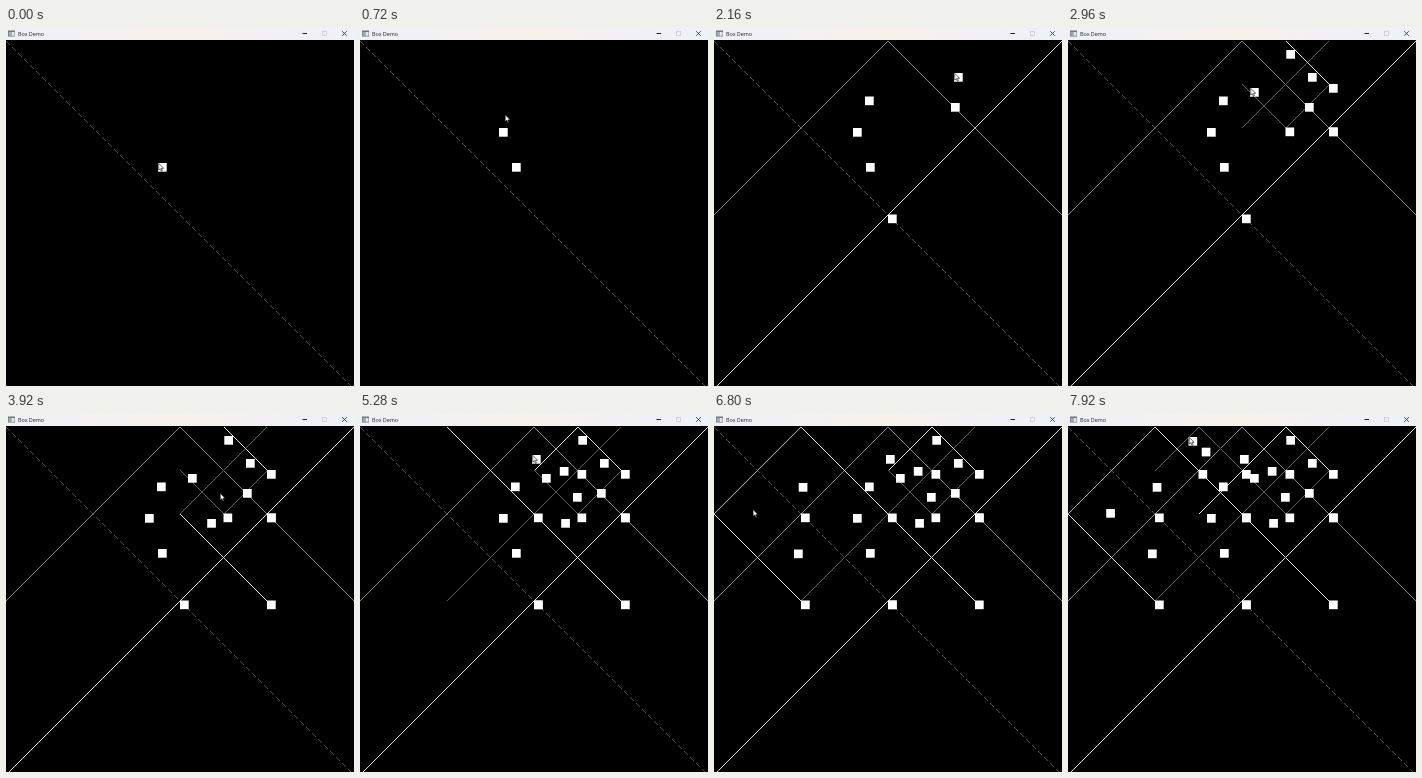
These frames come from a looping animation (348 px wide and 358 px high, 8 s). An HTML page with a canvas:

```html
<!DOCTYPE html>
<html lang="en">
<head>
<meta charset="utf-8">
<title>Quadtree</title>
<style>
  html, body { margin: 0; width: 100%; height: 100%; overflow: hidden; background: #000; }
  canvas { display: block; width: 348px; height: 358px; }
</style>
</head>
<body>
<canvas id="stage" width="348" height="358"></canvas>
<script>
const ctx = document.getElementById('stage').getContext('2d');
const LOOP = 8000, STEP = 80;
const TOP = 12.5, SIZE = 348, CAPACITY = 3, BOX = 8.7;

// Pointer path: time, x, y, and 1 where the button is pressed
const path = [
  [0, 152, 135, 1], [80, 152, 135], [480, 139, 100, 1], [560, 139, 100],
  [880, 150, 73], [1040, 151, 68.5, 1], [1120, 151, 68.5], [1360, 237.5, 75],
  [1440, 237, 75, 1], [1520, 237, 75], [1760, 238, 59], [2080, 240, 45, 1],
  [2160, 240, 45], [2400, 214, 24], [2560, 218.3, 22, 1], [2720, 218.3, 22],
  [2960, 182, 60, 1], [3120, 182, 60], [3520, 201.2, 105, 1], [3600, 201.2, 105],
  [3920, 213.5, 79], [4000, 213, 79, 1], [4080, 213, 79], [4320, 211, 67],
  [4400, 211, 67], [4640, 199.8, 53, 1], [4720, 199.8, 53], [5200, 172, 41, 1],
  [5360, 172, 41], [5600, 100, 64], [5840, 84.7, 69, 1], [5920, 84.7, 69],
  [6160, 80, 135.5, 1], [6240, 80, 135.5], [6400, 62, 96], [6480, 62, 96],
  [6720, 38.5, 95.5], [6880, 38.2, 95, 1], [6960, 38.2, 95], [7360, 133.7, 33.7, 1],
  [7520, 133.7, 33.7], [7840, 120.5, 23, 1], [8000, 120.5, 23]
];

// Line brightness by offset, in eighths of the field
const WHITE = '#dedede', LIGHT = '#b0b0b0', GREY = '#858585', DIM = '#5c5c5c', FAINT = '#4c4c4c';
const fallTone = { '-5': WHITE, '-4': GREY, '-3': DIM, '-2': WHITE, '2': WHITE };
const riseTone = { 2: LIGHT, 3: DIM, 4: GREY, 5: WHITE, 6: DIM, 7: DIM, 8: WHITE };

function pointer(t) {
  let i = 0;
  while (i < path.length - 2 && path[i + 1][0] <= t) i++;
  const [t0, x0, y0] = path[i], [t1, x1, y1] = path[i + 1];
  const u = (t - t0) / (t1 - t0), e = u * u * (3 - 2 * u);
  return [x0 + (x1 - x0) * e, y0 + (y1 - y0) * e];
}

// Quadrants: 0 top left, 1 top right, 2 bottom left, 3 bottom right
const makeNode = (x, y, size, quad) => ({ x, y, size, quad, points: [], kids: null });

function insert(node, p) {
  node.points.push(p);
  if (node.kids) return insertKid(node, p);
  if (node.points.length > CAPACITY) {
    const h = node.size / 2;
    node.kids = [0, 1, 2, 3].map(q => makeNode(node.x + (q & 1) * h, node.y + (q >> 1) * h, h, q));
    node.points.forEach(pt => insertKid(node, pt));
  }
}

function insertKid(node, [x, y]) {
  const h = node.size / 2;
  insert(node.kids[(x >= node.x + h ? 1 : 0) + (y >= node.y + h ? 2 : 0)], [x, y]);
}

function diagonal(node, rising, color, dashed) {
  const x = Math.round(node.x), y = Math.round(node.y), n = Math.round(node.size);
  ctx.fillStyle = color;
  for (let i = 0; i < n; i++) {
    if (dashed && i % 6 > 3) continue;
    ctx.fillRect(rising ? x + n - 1 - i : x + i, y + i, 1, 1);
  }
}

function drawLines(node) {
  if (!node.points.length) return;
  const unit = SIZE / 8, gx = node.x / unit, gy = (node.y - TOP) / unit;
  if (node.quad === 1 || node.quad === 2) {
    diagonal(node, false, fallTone[Math.round(gy - gx)] || DIM);
  } else if (node.quad !== undefined) {
    diagonal(node, true, riseTone[Math.round(gx + gy + node.size / unit)] || DIM);
  }
  if (node.kids) node.kids.forEach(drawLines);
}

function box(x, y) {
  ctx.fillStyle = '#fff';
  ctx.fillRect(x, y, BOX, BOX);
}

function drawCorners(node) {
  if (!node.points.length) return;
  box(node.x + node.size, node.y + node.size);
  if (node.kids) node.kids.forEach(drawCorners);
}

function line(color, width, ...pts) {
  ctx.strokeStyle = color;
  ctx.lineWidth = width;
  ctx.beginPath();
  for (const [x, y, x2, y2] of pts) { ctx.moveTo(x, y); ctx.lineTo(x2, y2); }
  ctx.stroke();
}

function drawTitleBar() {
  const g = ctx.createLinearGradient(0, 0, SIZE, 0);
  g.addColorStop(0, '#eef0f8');
  g.addColorStop(0.25, '#f4f0f3');
  g.addColorStop(0.5, '#f8f0e9');
  g.addColorStop(0.75, '#f3eff5');
  g.addColorStop(1, '#eef1f9');
  ctx.fillStyle = g;
  ctx.fillRect(0, 0, SIZE, 12);
  ctx.fillStyle = '#777';
  ctx.fillRect(2, 2.5, 7, 6);
  ctx.fillStyle = '#e4e8ea';
  ctx.fillRect(5.5, 4, 3, 3.8);
  ctx.fillStyle = '#9ab0b4';
  ctx.fillRect(2.7, 4, 2.3, 3.8);
  ctx.fillStyle = '#222';
  ctx.font = '5.4px "Open Sans", "Noto Sans", sans-serif';
  ctx.fillText('Box Demo', 12, 7.6);
  line('#222', 1, [296.5, 5.5, 301, 5.5]);
  line('#222', 0.8, [336.2, 3.2, 340.8, 7.8], [340.8, 3.2, 336.2, 7.8]);
  ctx.strokeStyle = '#c9c7cc';
  ctx.lineWidth = 0.7;
  ctx.strokeRect(316.5, 3.5, 4, 4);
}

function drawPointer([x, y]) {
  ctx.save();
  ctx.translate(x + 0.7, y + 0.3);
  ctx.beginPath();
  [[0, 0], [0, 6.8], [1.6, 5.4], [2.7, 8], [3.7, 7.5], [2.7, 5.1], [4.9, 5]]
    .forEach(([px, py]) => ctx.lineTo(px, py));
  ctx.closePath();
  ctx.fillStyle = '#fff';
  ctx.fill();
  ctx.strokeStyle = '#000';
  ctx.lineWidth = 0.6;
  ctx.stroke();
  ctx.restore();
}

function draw(t) {
  const root = makeNode(0, TOP, SIZE);
  path.filter(k => k[3] && k[0] <= t).forEach(([, x, y]) => insert(root, [x, y]));

  ctx.fillStyle = '#000';
  ctx.fillRect(0, 0, 348, 358);
  diagonal(root, false, FAINT, true);
  if (root.kids) diagonal(root, true, riseTone[8]);
  drawLines(root);
  drawCorners(root);
  root.points.forEach(([x, y]) => box(x, y));
  drawTitleBar();
  drawPointer(pointer(t));
}

const start = performance.now();
function tick() {
  const t = (performance.now() - start) % LOOP;
  draw(Math.floor(t / STEP) * STEP);
  requestAnimationFrame(tick);
}
tick();
</script>
</body>
</html>
```
